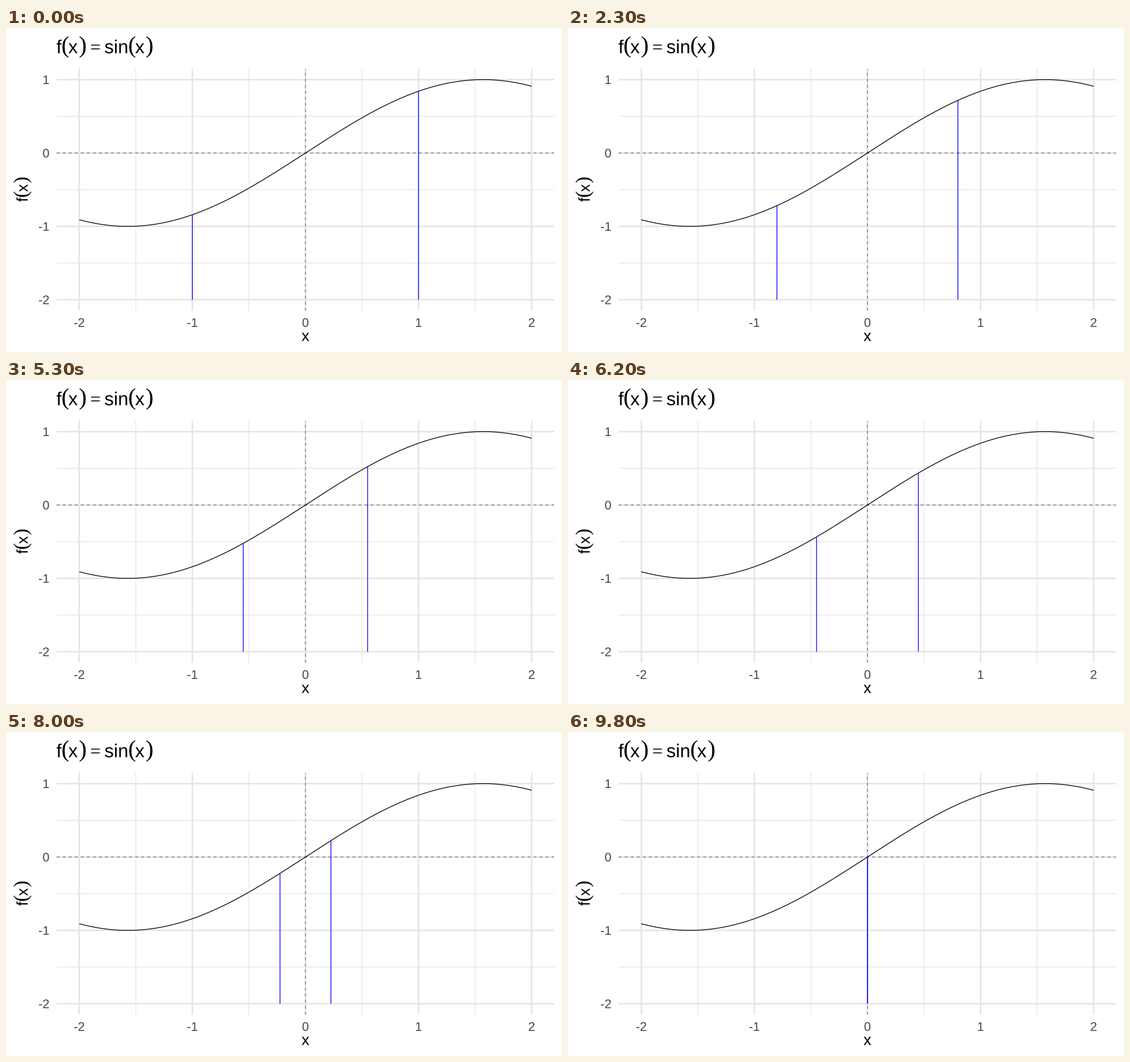
A matplotlib script for the animation above (10 s loop, 980 px wide and 572 px high).

```python
import numpy as np
import matplotlib.pyplot as plt
from matplotlib.animation import FuncAnimation
from matplotlib.patches import PathPatch
from matplotlib.textpath import TextPath
from matplotlib.transforms import Affine2D

W, H, DPI = 980, 572, 100
PX = 72 / DPI  # points per pixel

# Pixel position of the data origin and pixels per data unit
X0, Y0 = 527.8, 220.66
UX, UY = 199.33, 129.55
XLIM, YLIM = (-2.2, 2.2), (-2.15, 1.15)

THIN, THICK = 1.33, 2.67
GRID, DASH, TICK = "#e5e5e5", "#777777", "#454545"

SANS, SERIF = "Liberation Sans", "Liberation Serif"
TICK_SIZE, LABEL_SIZE, TITLE_SIZE = 22, 27.5, 33

fig = plt.figure(figsize=(W / DPI, H / DPI), dpi=DPI, facecolor="white")

panel = fig.add_axes([
    (X0 + XLIM[0] * UX) / W,
    1 - (Y0 - YLIM[0] * UY) / H,
    (XLIM[1] - XLIM[0]) * UX / W,
    (YLIM[1] - YLIM[0]) * UY / H,
])
panel.set(xlim=XLIM, ylim=YLIM)
panel.axis("off")

page = fig.add_axes([0, 0, 1, 1])
page.set(xlim=(0, W), ylim=(H, 0))
page.axis("off")


def line(xs, ys, color, width=THIN, **style):
    artist, = panel.plot(xs, ys, color=color, lw=width * PX, snap=False,
                         solid_capstyle="butt", **style)
    return artist


def glyphs(text, x, y, size, color="black", font=SANS, angle=0):
    """Draw text as outlines with its baseline starting at pixel (x, y)."""
    path = TextPath((0, 0), text, size=size, prop={"family": font})
    place = Affine2D().scale(1, -1).rotate_deg(-angle).translate(x, y)
    page.add_patch(PathPatch(place.transform_path(path), fc=color, lw=0,
                             snap=False))


def call(name, name_width, x, y, size, angle=0):
    """Draw name(x) with tall brackets; widths are in ems."""
    turn = np.radians(angle)

    def put(text, along, up=0, scale=1, font=SANS):
        dx, dy = along * size, up * size
        glyphs(text,
               x + dx * np.cos(turn) - dy * np.sin(turn),
               y - dx * np.sin(turn) - dy * np.cos(turn),
               size * scale, font=font, angle=angle)

    put(name, 0)
    put("(", name_width - 0.01, 0.028, 1.27, SERIF)
    put("x", name_width + 0.36)
    put(")", name_width + 0.92, 0.028, 1.27, SERIF)


def tick_width(text):
    return TICK_SIZE * sum(0.333 if c == "-" else 0.556 for c in text)


# Grid
for width, x_ticks, y_ticks in (
    (THIN, (-1.5, -0.5, 0.5, 1.5), (-1.5, -0.5, 0.5)),
    (THICK, range(-2, 3), range(-2, 2)),
):
    for v in y_ticks:
        line(XLIM, (v, v), GRID, width)
    for v in x_ticks:
        line((v, v), YLIM, GRID, width)

# Zero axes and curve
dashed = dict(ls=(0, (4, 4)), dash_capstyle="butt")
line(XLIM, (0, 0), DASH, **dashed)
line((0, 0), YLIM, DASH, **dashed)
curve_x = np.linspace(-2, 2, 201)
line(curve_x, np.sin(curve_x), "black")

# Tick labels
for v in range(-2, 3):
    text = str(v)
    glyphs(text, X0 + v * UX - tick_width(text) / 2, 527.6, TICK_SIZE, TICK)
for v in range(-2, 2):
    text = str(v)
    glyphs(text, 76.6 - tick_width(text), Y0 - v * UY + 7.8, TICK_SIZE, TICK)

# Titles
call("f", 0.278, 88.8, 44.5, TITLE_SIZE)
glyphs("=", 148.4, 44.5, TITLE_SIZE, font=SERIF)
call("sin", 1.278, 173.5, 44.5, TITLE_SIZE)
glyphs("x", X0 - LABEL_SIZE / 4, 552.6, LABEL_SIZE)
call("f", 0.278, 38.2, 307, LABEL_SIZE, angle=90)

bars = [line((s, s), (-2, 0), "blue") for s in (-1, 1)]


def step_at(ms):
    if ms < 5600:
        return (ms + 100) // 300
    return 19 + (ms - 5600) // 200


def update(frame):
    h = 1 - 0.025 * step_at(frame * 100)
    for bar, x in zip(bars, (-h, h)):
        bar.set_data((x, x), (-2, np.sin(x)))
    return bars


anim = FuncAnimation(fig, update, frames=100, interval=100, repeat=True,
                     repeat_delay=0, blit=False)
plt.show()
```
